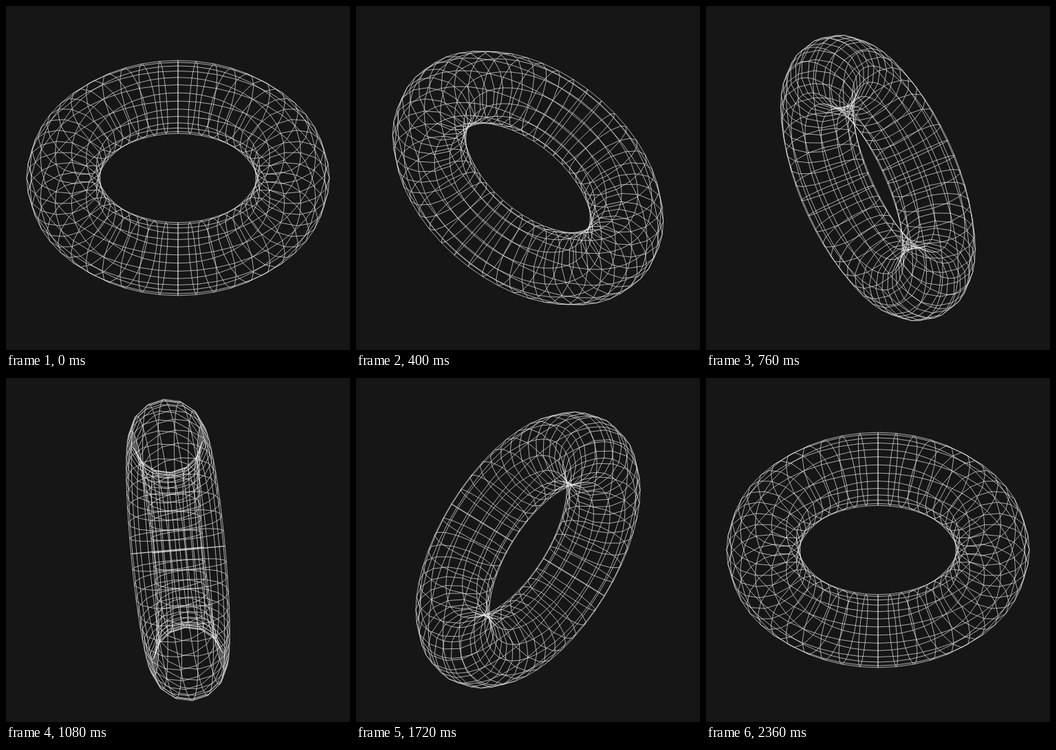
Write an HTML page with a canvas that moves like this. It is 500x500 px and loops after 2.4 s.

```html
<!DOCTYPE html>
<html lang="en">
<head>
<meta charset="utf-8">
<title>Wireframe torus</title>
<style>
  html, body { margin: 0; width: 100%; height: 100%; overflow: hidden; background: #161616; }
  canvas { display: block; width: 500px; height: 500px; }
</style>
</head>
<body>
<canvas id="stage" width="500" height="500"></canvas>
<script>
const ctx = document.getElementById('stage').getContext('2d');
const SIZE = 500, RING = 500 / 3, TUBE = 160 / 3;
const RING_STEPS = 48, TUBE_STEPS = 14;
const STEP_MS = 40, STEPS = 60;
const TILT = Math.SQRT1_2; // sine and cosine of the 45 degree camera tilt
const TAU = Math.PI * 2;

// Turn a torus point around its own diameter, then tilt it to the camera.
function project(i, j, sin, cos) {
  const u = i / RING_STEPS * TAU, v = j / TUBE_STEPS * TAU;
  const reach = RING + TUBE * Math.cos(v);
  const x = reach * Math.sin(u), y = reach * Math.cos(u), z = TUBE * Math.sin(v);
  return [
    SIZE / 2 + x * cos + z * sin,
    SIZE / 2 + TILT * (y + x * sin - z * cos)
  ];
}

function strokeLoop(count, pointAt) {
  ctx.beginPath();
  for (let k = 0; k < count; k++) ctx.lineTo(...pointAt(k));
  ctx.closePath();
  ctx.stroke();
}

function draw(turn) {
  const sin = Math.sin(turn), cos = Math.cos(turn);
  ctx.fillStyle = '#161616';
  ctx.fillRect(0, 0, SIZE, SIZE);
  ctx.strokeStyle = '#eaeaea';
  ctx.lineWidth = 0.7;
  ctx.lineJoin = 'round';
  for (let i = 0; i < RING_STEPS; i++) strokeLoop(TUBE_STEPS, j => project(i, j, sin, cos));
  for (let j = 0; j < TUBE_STEPS; j++) strokeLoop(RING_STEPS, i => project(i, j, sin, cos));
}

// Half a turn per loop; the first and last steps share one pose.
function tick() {
  const step = Math.floor(performance.now() / STEP_MS) % STEPS;
  draw(step / (STEPS - 1) * Math.PI);
  requestAnimationFrame(tick);
}
tick();
</script>
</body>
</html>
```
